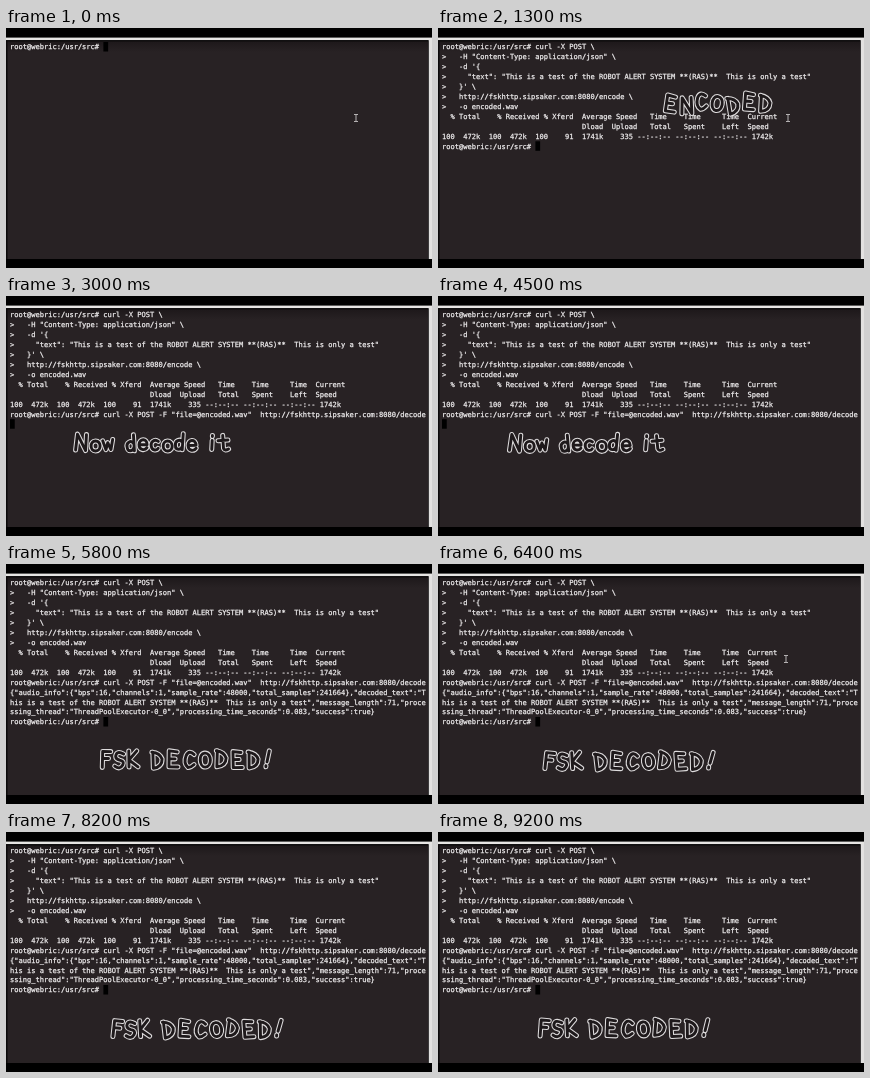
An HTML page with a canvas that plays this animation: 426x240 px, repeating every 9.3 s.

```html
<!DOCTYPE html>
<html lang="en">
<head>
<meta charset="utf-8">
<title>Terminal demo</title>
<style>
  html, body { margin: 0; width: 100%; height: 100%; overflow: hidden; background: #000; }
  canvas { display: block; width: 426px; height: 240px; }
</style>
</head>
<body>
<canvas id="stage" width="426" height="240"></canvas>
<script>
const ctx = document.getElementById('stage').getContext('2d');
const LOOP = 9300, STEP = 100;
const LEFT = 4, CELL = 4.245, LINE = 9.93, BASELINE = 21.4;
const PAPER = '#282224';

const prompt = 'root@webric:/usr/src# ';
const encode = [
  prompt + 'curl -X POST \\',
  '>   -H "Content-Type: application/json" \\',
  '>   -d \'{',
  '>     "text": "This is a test of the ROBOT ALERT SYSTEM **(RAS)**  This is only a test"',
  '>   }\' \\',
  '>   http://fskhttp.sipsaker.com:8080/encode \\',
  '>   -o encoded.wav'
];
const progress = [
  '  % Total    % Received % Xferd  Average Speed   Time    Time     Time  Current',
  '                                 Dload  Upload   Total   Spent    Left  Speed',
  '100  472k  100  472k  100    91  1741k    335 --:--:-- --:--:-- --:--:-- 1742k'
];
const decode = prompt + 'curl -X POST -F "file=@encoded.wav"  http://fskhttp.sipsaker.com:8080/decode';
const reply = [
  '{"audio_info":{"bps":16,"channels":1,"sample_rate":48000,"total_samples":241664},"decoded_text":"T',
  'his is a test of the ROBOT ALERT SYSTEM **(RAS)**  This is only a test","message_length":71,"proce',
  'ssing_thread":"ThreadPoolExecutor-0_0","processing_time_seconds":0.083,"success":true}'
];

// Hand-drawn letter skeletons, 16 units tall
const glyphs = {
  E: 'M9 1L1 0V16H10M1 8H7',
  N: 'M0 16L1 0L10 16V0',
  C: 'M10 3Q5-2 2 4Q-1 12 4 16Q7 16 10 13',
  O: 'M5 1C-2 1-1 15 5 15C12 15 12 1 5 1Z',
  D: 'M1 0V16Q10 15 10 7Q8 1 0 0',
  F: 'M9 0H1V16M1 7H7',
  S: 'M9 2Q2-2 1 4Q1 7 5 8Q10 9 8 13Q5 18 0 14',
  K: 'M1 0V16M9 0L1 9L10 16',
  '!': 'M5 0L3 11M2 15V16',
  o: 'M5 6C-1 6-1 16 5 16C11 16 11 6 5 6Z',
  w: 'M0 7L3 16L5 9L8 16L10 6',
  d: 'M8 0V16M8 9C5 4 0 8 1 12C1 17 7 17 8 12',
  e: 'M1 11H9C9 4 1 5 1 11C1 17 7 17 9 14',
  c: 'M8 7C4 4 0 8 1 12C2 17 7 16 8 14',
  i: 'M2 7V16M2 2V3',
  t: 'M5 1V14Q6 17 10 15M0 6H10'
};
const paths = Object.fromEntries(Object.entries(glyphs).map(([k, d]) => [k, new Path2D(d)]));

function advance(ch) {
  if (ch === ' ') return 11;
  if (ch === 'i') return 8;
  if (ch === 'N') return 14.5;
  if ('FSK'.includes(ch)) return 13.2;
  return 'DECO'.includes(ch) ? 16 : 12.2;
}

const labels = [
  { text: 'ENCODED', from: 900, to: 1900, x: 225, y: 67, sway: 5, peak: 1150, bob: 2.5, tilt: 0.22 },
  { text: 'Now decode it', from: 1900, to: 4700, x: 73.5, y: 139, sway: 5, peak: 3335, bob: 0.8, tilt: 0.2 },
  { text: 'FSK DECODED!', from: 5800, to: LOOP, x: 103, y: 188.5, sway: 7.5, peak: 6250, bob: 0.7, tilt: 0.16 }
];

function screenLines(t) {
  if (t < 300) return [prompt];
  if (t < 800) return encode.slice(0, [2, 3, 4, 6, 7][Math.floor((t - 300) / STEP)]);
  const encoded = [...encode, ...progress];
  if (t < 2300) return [...encoded, prompt];
  if (t < 4900) return [...encoded, decode, ''];
  return [...encoded, decode, ...reply, prompt];
}

function fill(color, x, y, w, h) {
  ctx.fillStyle = color;
  ctx.fillRect(x, y, w, h);
}

function drawWindow() {
  fill('#000', 0, 0, 426, 240);
  fill('#e6e5e3', 0, 9.6, 426, 2.6);
  fill('#e2e1e0', 422.5, 12, 3.5, 219);
  fill('#0b090a', 0, 12.2, 422.5, 218.8);
  const shade = ctx.createLinearGradient(0, 13, 0, 24);
  shade.addColorStop(0, '#1d181a');
  shade.addColorStop(1, PAPER);
  fill(shade, 1.5, 13.5, 420.5, 217.5);
}

function drawTerminal(t) {
  const lines = screenLines(t), last = lines.length - 1;
  ctx.save();
  ctx.filter = 'blur(0.5px)';
  fill('#000', LEFT + lines[last].length * CELL, 14 + last * LINE, CELL + 0.5, 9.5);
  ctx.font = '7.05px "DejaVu Sans Mono", monospace';
  ctx.fillStyle = ctx.strokeStyle = '#f0eeef';
  ctx.lineWidth = 0.25;
  lines.forEach((line, i) => {
    ctx.fillText(line, LEFT, BASELINE + i * LINE);
    ctx.strokeText(line, LEFT, BASELINE + i * LINE);
  });
  ctx.restore();
}

function drawPointer(x, y) {
  ctx.strokeStyle = '#b5b2b3';
  ctx.lineWidth = 1;
  ctx.stroke(new Path2D(`M${x - 2} ${y - 3.5}h4M${x} ${y - 3.5}v7M${x - 2} ${y + 3.5}h4`));
}

function drawLabel({ text, x, y, sway, peak, bob, tilt }, t) {
  const swing = Math.cos((t - peak) / 900 * 2 * Math.PI);
  const pens = [['#dedcdd', 5], ['#1e191b', 2.9]];
  let left = x + sway * swing;
  const letters = [...text].map((ch, i) => {
    const letter = { ch, left, dy: swing + bob * Math.sin(i * 2.1), turn: tilt * Math.sin(i * 2.4 + 1) * (0.6 + 0.4 * swing) };
    left += advance(ch);
    return letter;
  });
  ctx.lineCap = ctx.lineJoin = 'round';
  for (const [color, width] of pens) {
    ctx.strokeStyle = color;
    ctx.lineWidth = width;
    for (const { ch, left, dy, turn } of letters) {
      if (!paths[ch]) continue;
      ctx.save();
      ctx.translate(left + 5, y + 8 + dy);
      ctx.rotate(turn);
      ctx.translate(-5, -8);
      ctx.stroke(paths[ch]);
      ctx.restore();
    }
  }
  ctx.lineCap = 'butt';
}

function draw(t) {
  drawWindow();
  drawTerminal(t);
  if (t < 2200) drawPointer(350, 90);
  if (t >= 6400 && t < 6800) drawPointer(348, 95);
  for (const label of labels) {
    if (t >= label.from && t < label.to) drawLabel(label, t);
  }
}

const start = performance.now();
function tick() {
  const t = (performance.now() - start) % LOOP;
  draw(Math.floor(t / STEP) * STEP);
  requestAnimationFrame(tick);
}
tick();
</script>
</body>
</html>
```
